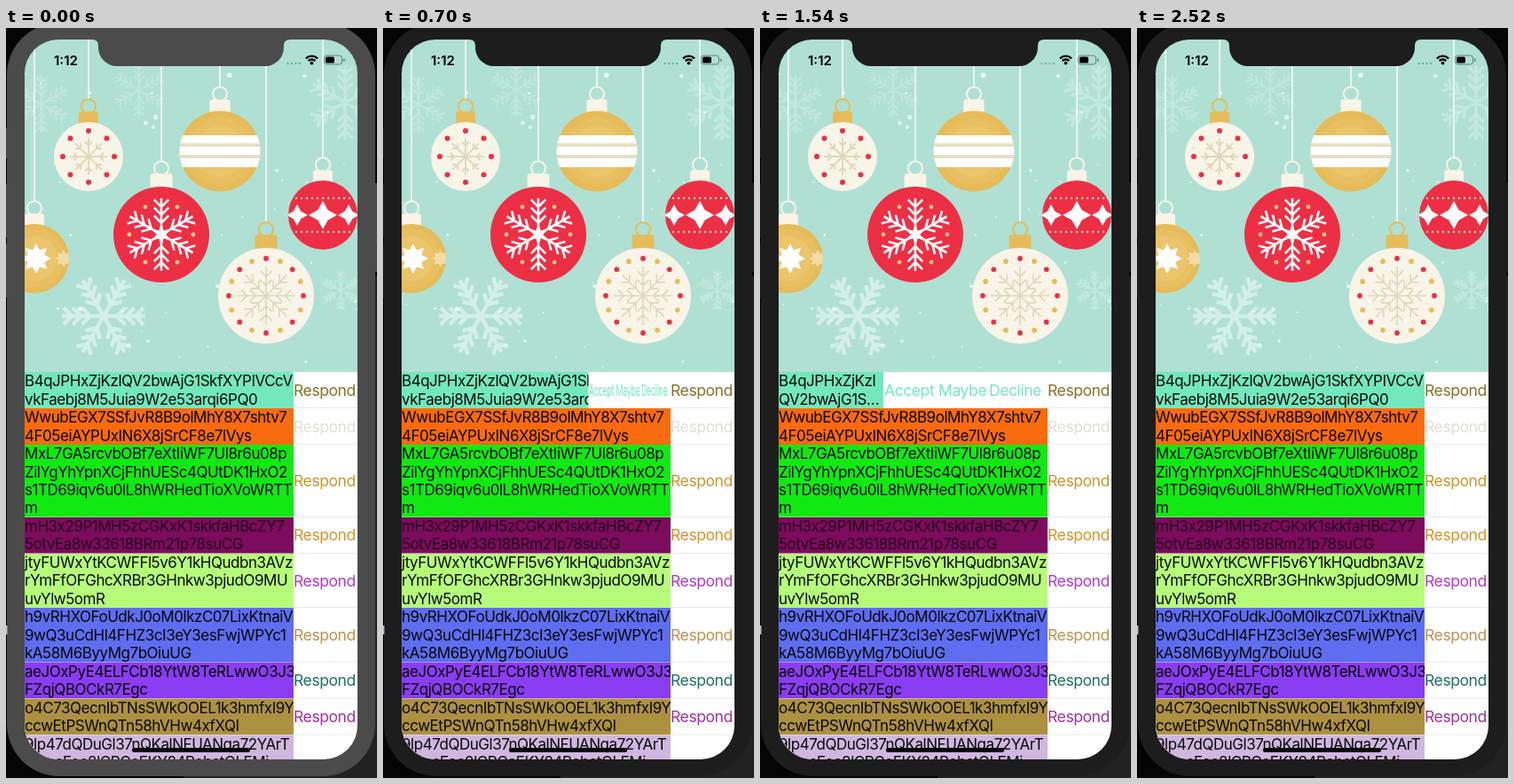
An HTML page with a canvas that plays this animation: 418 by 846 pixels, repeating every 2590 ms.

```html
<!DOCTYPE html>
<html lang="en">
<head>
<meta charset="utf-8">
<title>Invitation list</title>
<style>
html, body { margin: 0; width: 418px; height: 846px; overflow: hidden; background: #050505; }
canvas { display: block; }
</style>
</head>
<body>
<canvas id="stage" width="418" height="846"></canvas>
<script>
const ctx = document.getElementById('stage').getContext('2d');
const LOOP = 2590, STEP = 70, OPEN_AT = 550, CLOSE_AT = 1876, DURATION = 300;
const LEFT = 21, RIGHT = 396, CLOSED = 324, OPEN = 139, LIST_TOP = 388, LINE = 61 / 3;
const GOLD = '#e6bb59', CREAM = '#f8f4e8', RED = '#ec2f45', BEIGE = '#e0d8bc', WHITE = '#fff';

const rows = [
  ['#74e8bd', '#8b702b', 'B4qJPHxZjKzlQV2bwAjG1SkfXYPIVCcV', 'vkFaebj8M5Juia9W2e53arqi6PQ0'],
  ['#f96b0e', '#dfdfd3', 'WwubEGX7SSfJvR8B9olMhY8X7shtv7', '4F05eiAYPUxIN6X8jSrCF8e7lVys'],
  ['#10ea12', '#c5962c', 'MxL7GA5rcvbOBf7eXtIiWF7Ul8r6u08p', 'ZilYgYhYpnXCjFhhUESc4QUtDK1HxO2', 's1TD69iqv6u0lL8hWRHedTioXVoWRTT', 'm'],
  ['#7d0b5e', '#d5942f', 'mH3x29P1MH5zCGKxK1skkfaHBcZY7', '5otvEa8w33618BRm21p78suCG'],
  ['#b6fc7a', '#ad3ccb', 'jtyFUWxYtKCWFFl5v6Y1kHQudbn3AVz', 'rYmFfOFGhcXRBr3GHnkw3pjudO9MU', 'uvYlw5omR'],
  ['#5f6df0', '#bd9250', 'h9vRHXOFoUdkJ0oM0lkzC07LixKtnaiV', '9wQ3uCdHl4FHZ3cI3eY3esFwjWPYc1', 'kA58M6ByyMg7bOiuUG'],
  ['#8a3df2', '#217163', 'aeJOxPyE4ELFCb18YtW8TeRLwwO3J3', 'FZqjQBOCkR7Egc'],
  ['#ad9140', '#9e329a', 'o4C73QecnIbTNsSWkOOEL1k3hmfxI9Y', 'ccwEtPSWnQTn58hVHw4xfXQI'],
  ['#cfb7df', '', '9lp47dQDuGl37nQKalNFUANqa72YArT', 'f1DocFoe8lCRCoFKY84RohctOLEMj']
];

function rect(x, y, w, h, color, radius = 0) {
  ctx.fillStyle = color;
  ctx.beginPath();
  ctx.roundRect(x, y, w, h, radius);
  ctx.fill();
}

function disc(x, y, r, color) {
  ctx.fillStyle = color;
  ctx.beginPath();
  ctx.arc(x, y, r, 0, 7);
  ctx.fill();
}

function text(str, x, y, size, color, weight = 400) {
  ctx.font = `${weight} ${size}px Inter, sans-serif`;
  ctx.letterSpacing = weight > 400 ? '0px' : '-0.47px';
  ctx.fillStyle = color;
  ctx.fillText(str, x, y);
}

function clipTo(x, y, w, h, draw, radius = 0) {
  ctx.save();
  ctx.beginPath();
  ctx.roundRect(x, y, w, h, radius);
  ctx.clip();
  draw();
  ctx.restore();
}

function ring(x, y, radius, count, size, colors, turn = 0) {
  for (let i = 0; i < count; i++) {
    const a = (i + turn) / count * Math.PI * 2;
    disc(x + radius * Math.sin(a), y - radius * Math.cos(a), size, colors[i % colors.length]);
  }
}

function flake(x, y, r, color, width, { arms = 6, branches = [0.32, 0.54, 0.76], turn = 0 } = {}) {
  ctx.save();
  ctx.translate(x, y);
  ctx.rotate(turn);
  ctx.strokeStyle = color;
  ctx.lineWidth = width;
  ctx.beginPath();
  for (let i = 0; i < arms; i++) {
    ctx.moveTo(0, 0);
    ctx.lineTo(0, -r);
    for (const k of branches) {
      const b = r * 0.2;
      ctx.moveTo(-b, -r * k - b);
      ctx.lineTo(0, -r * k);
      ctx.lineTo(b, -r * k - b);
    }
    ctx.rotate(Math.PI * 2 / arms);
  }
  ctx.stroke();
  ctx.restore();
}

function star(x, y, r, points, inner, color) {
  ctx.fillStyle = color;
  ctx.beginPath();
  for (let i = 0; i < points * 2; i++) {
    const a = i * Math.PI / points, d = i % 2 ? r * inner : r;
    ctx.lineTo(x + d * Math.sin(a), y - d * Math.cos(a));
  }
  ctx.fill();
}

function bauble(x, y, r, color, capColor, decorate) {
  const capW = r * 0.2 + 14, capH = r * 0.2 + 5, top = y - r - capH + 1;
  rect(x - 0.8, 13, 1.6, top - 27, '#f4fbf8');
  ctx.strokeStyle = capColor;
  ctx.lineWidth = 2;
  ctx.beginPath();
  ctx.arc(x, top - 6, 8, 0, 7);
  ctx.stroke();
  rect(x - capW / 2, top, capW, capH + 3, capColor, 3);
  disc(x, y, r, color);
  ctx.save();
  ctx.beginPath();
  ctx.arc(x, y, r, 0, 7);
  ctx.clip();
  decorate(x, y);
  ctx.restore();
}

function glow(x, y, r) {
  disc(x, y, r * 0.85, '#e8bf61');
  disc(x, y, r * 0.65, '#ebc56c');
}

function snow() {
  let seed = 11;
  const rnd = () => (seed = seed * 16807 % 2147483647) / 2147483647;
  for (let i = 0; i < 60; i++) {
    disc(LEFT + rnd() * 375, 45 + rnd() * 340, 0.8 + rnd() * rnd() * 2.6, 'rgba(245,255,251,.75)');
  }
}

function picture() {
  rect(LEFT, 13, 375, 375, '#b0e0d3');
  flake(150, 70, 30, '#c0e7dd', 2);
  flake(40, 86, 32, '#c0e7dd', 2.5);
  flake(382, 84, 42, '#c3e9df', 3.5);
  flake(377, 296, 22, '#c3e9df', 2);
  flake(110, 325, 47, '#d3efe8', 4.5, { turn: Math.PI / 6 });
  snow();

  bauble(93, 145, 39, CREAM, GOLD, (x, y) => {
    flake(x, y, 21, BEIGE, 2, { arms: 8, branches: [0.6] });
    ring(x, y, 29, 8, 3, [RED]);
  });
  bauble(241, 139, 45.5, GOLD, CREAM, (x, y) => {
    glow(x, y, 45);
    rect(x - 46, 121, 92, 36, WHITE);
    for (const line of [130, 143]) rect(x - 46, line, 92, 4, '#e7dfc5');
  });
  bauble(175, 233, 54, RED, CREAM, (x, y) => {
    flake(x, y, 41, WHITE, 2.6);
    star(x, y, 13, 6, 0.4, WHITE);
    ring(x, y, 36, 6, 2.4, ['#f0c786'], 0.5);
  });
  bauble(293, 302, 54, CREAM, GOLD, (x, y) => {
    flake(x, y, 33, BEIGE, 1.7, { arms: 8, branches: [0.35, 0.65] });
    ring(x, y, 42, 16, 2.9, [RED, GOLD]);
  });
  bauble(357, 211, 39, RED, CREAM, (x, y) => {
    for (const dx of [-29, 0, 29]) star(x + dx, y, dx ? 12 : 16, 4, 0.5, WHITE);
    for (let dx = -36; dx <= 36; dx += 6) {
      disc(x + dx, y - 19, 1.2, '#f6d9bd');
      disc(x + dx, y + 19, 1.2, '#f6d9bd');
    }
  });
  bauble(32, 260, 39, GOLD, CREAM, (x, y) => {
    glow(x, y, 39);
    star(x + 2, y, 17, 8, 0.6, WHITE);
    star(x + 33, y, 10, 8, 0.6, '#f3dca8');
  });
}

function statusBar(dim) {
  text('1:12', 54, 41.5, 15, '#000', 600);
  for (let i = 0; i < 4; i++) disc(317.5 + i * 4.5, 40, 1.2, dim ? '#91afa8' : '#5dbb7e');
  ctx.strokeStyle = '#000';
  ctx.lineWidth = 2.3;
  for (const r of [5.5, 9.3]) {
    ctx.beginPath();
    ctx.arc(344.5, 41, r, -Math.PI * 0.75, -Math.PI * 0.25);
    ctx.stroke();
  }
  disc(344.5, 39.6, 1.9, '#000');
  ctx.lineWidth = 1;
  ctx.strokeStyle = '#607f76';
  ctx.beginPath();
  ctx.roundRect(358.5, 31, 20, 10, 3);
  ctx.stroke();
  rect(360, 32.5, 10, 7, '#000', 1.5);
  rect(380, 34.5, 1.5, 3.5, '#607f76', 1);
}

function list(opening, open) {
  rect(LEFT, LIST_TOP, 375, 440, WHITE);
  let y = LIST_TOP;
  rows.forEach(([fill, tint, ...lines], i) => {
    const height = lines.length * LINE + 1 / 3;
    const edge = i ? CLOSED : CLOSED + (OPEN - CLOSED) * open;
    const shown = !i && open === 1 ? ['B4qJPHxZjKzl', 'QV2bwAjG1S…'] : lines;
    clipTo(LEFT, y, edge - LEFT, height, () => {
      rect(LEFT, y, edge - LEFT, height, fill);
      shown.forEach((line, n) => text(line, LEFT, y + 16.3 + n * LINE, 17, i === 3 ? '#22021a' : '#080808'));
    });
    if (!i && opening && open > 0) {
      ctx.save();
      ctx.translate(edge, 0);
      ctx.scale(open, 1);
      [['Accept', 1], ['Maybe', 62], ['Decline', 119]].forEach(([label, x]) => text(label, x, y + 26.5, 17.6, fill));
      ctx.restore();
    }
    if (tint) text('Respond', CLOSED, y + height / 2 + 6.3, 17.6, tint);
    y += height;
    rect(edge, y - 0.5, RIGHT - edge, 0.5, '#d2d2d4');
  });
}

function notch(color) {
  ctx.fillStyle = color;
  ctx.beginPath();
  ctx.moveTo(97, 12);
  ctx.lineTo(97, 13);
  ctx.quadraticCurveTo(104, 13, 104, 20);
  ctx.arcTo(104, 43, 126, 43, 21);
  ctx.arcTo(313, 43, 313, 20, 21);
  ctx.lineTo(313, 20);
  ctx.quadraticCurveTo(313, 13, 320, 13);
  ctx.lineTo(320, 12);
  ctx.fill();
}

function ease(t, start) {
  const k = Math.min(1, Math.max(0, (t - start) / DURATION));
  return k * k * (3 - 2 * k);
}

function draw(t) {
  const bezel = t < 490 ? '#4b4b4b' : '#1d1d1d';
  const opening = t < CLOSE_AT;
  const open = opening ? ease(t, OPEN_AT) : 1 - ease(t, CLOSE_AT);

  rect(0, 0, 418, 846, '#050505');
  rect(200, 280, 218, 566, '#222');
  for (const [y, h] of [[113, 34], [176, 60], [244, 60]]) rect(0, y, 4, h, bezel);
  rect(412, 175, 6, 100, bezel);
  rect(1, -6, 415, 850, bezel, 59);
  rect(0, 674, 1.5, 10, '#c9c0ae');

  clipTo(LEFT, 13, 375, 812, () => {
    picture();
    list(opening, open);
    statusBar(t >= 840 && t < 1820);
    rect(142, 812, 133, 5, '#000', 2.5);
  }, 38);
  notch(bezel);
}

function tick() {
  draw(Math.floor(performance.now() % LOOP / STEP) * STEP);
  requestAnimationFrame(tick);
}
tick();
</script>
</body>
</html>
```
